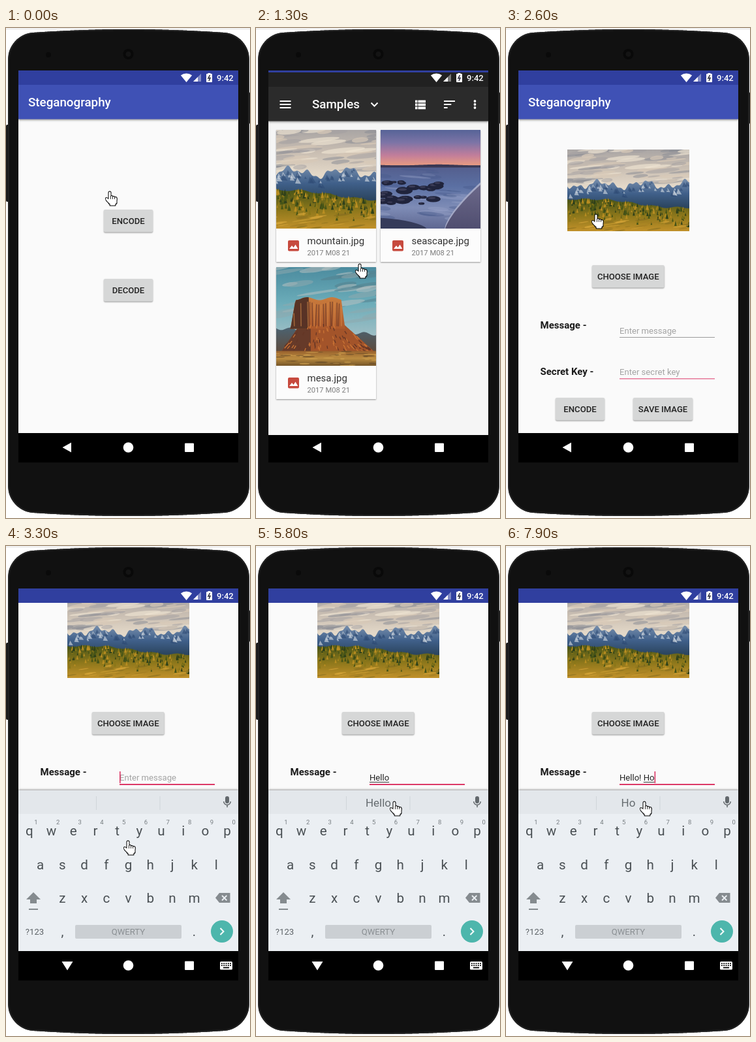
Recreate the animation shown at these times as an HTML page with a canvas. Size 374 by 750 pixels, loop 8 s.

```html
<!DOCTYPE html>
<html lang="en">
<head>
<meta charset="utf-8">
<title>Steganography demo</title>
<style>
html, body { margin: 0; width: 100%; height: 100%; overflow: hidden; background: #fff; }
canvas { display: block; width: 374px; height: 750px; }
</style>
</head>
<body>
<canvas id="stage" width="374" height="750"></canvas>
<script>
const LOOP = 8000, STEP = 100, PAN = 109;
const SCREEN = { x: 19, y: 65, w: 337, mid: 187.5 };
const BLUE = '#3f51b5', DARK_BLUE = '#303f9f', PINK = '#dc3866';
let c = document.getElementById('stage').getContext('2d');

// ---------- helpers ----------
const clamp = v => Math.max(0, Math.min(1, v));
const progress = (t, from, to) => clamp((t - from) / (to - from));
const easeOut = v => 1 - Math.pow(1 - v, 3);
const easeInOut = v => v * v * (3 - 2 * v);
const repeat = (n, draw) => { for (let i = 0; i < n; i++) draw(i); };

function rect(x, y, w, h, color) { c.fillStyle = color; c.fillRect(x, y, w, h); }
function round(x, y, w, h, r, color) {
  c.fillStyle = color; c.beginPath(); c.roundRect(x, y, w, h, r); c.fill();
}
function blob(x, y, rx, ry, color, tilt = 0) {
  c.fillStyle = color; c.beginPath(); c.ellipse(x, y, rx, ry, tilt, 0, 7); c.fill();
}
function circle(x, y, r, color) { blob(x, y, r, r, color); }
function trace(p) {
  c.beginPath();
  for (let i = 0; i < p.length; i += 2) c.lineTo(p[i], p[i + 1]);
}
function poly(color, ...p) { trace(p); c.fillStyle = color; c.fill(); }
function line(color, width, ...p) {
  trace(p); c.strokeStyle = color; c.lineWidth = width; c.stroke();
}
function text(s, x, y, size, color, weight = 400, align = 'left') {
  c.font = `${weight} ${size}px Roboto, sans-serif`;
  c.textAlign = align; c.fillStyle = color; c.fillText(s, x, y);
  return c.measureText(s).width;
}
function shadowed(draw, blur = 2, dy = 1) {
  c.save();
  c.shadowColor = '#0006'; c.shadowBlur = blur; c.shadowOffsetY = dy;
  draw();
  c.restore();
}
function layer(dy, alpha, draw) {
  c.save();
  c.globalAlpha = alpha;
  c.translate(0, Math.round(dy));
  draw();
  c.restore();
}
function gradient(y0, y1, ...colors) {
  const g = c.createLinearGradient(0, y0, 0, y1);
  colors.forEach((k, i) => g.addColorStop(i / (colors.length - 1), k));
  return g;
}
function random(seed) {
  return () => (seed = (seed * 16807) % 2147483647) / 2147483647;
}

// ---------- pictures, each drawn in a space 200 units high ----------
function ridge(width, height, base, color) {
  c.fillStyle = color; c.beginPath(); c.moveTo(0, base);
  for (let x = 0; x <= width; x += 2) c.lineTo(x, height(x));
  c.lineTo(width, base); c.fill();
}
function streaks(n, rnd, top, bottom, size, tilt, colors) {
  repeat(n, i => blob(rnd() * 300, top + rnd() * (bottom - top),
    size * (.4 + rnd()), size * (.05 + rnd() * .12), colors[i % colors.length], tilt));
}
function mountain() {
  const rnd = random(41);
  rect(0, 0, 300, 200, gradient(0, 90, '#a9a5a4', '#c9beb2', '#e3d8c8'));
  streaks(70, rnd, 0, 80, 32, -.1, ['#efe4d3aa', '#8b8d9588', '#d9cab8aa', '#a39fa188']);
  const peaks = x => 86 + 7 * Math.sin(x / 17) + 5 * Math.sin(x / 7 + 1) + 3 * Math.sin(x / 3.1);
  ridge(300, peaks, 150, gradient(76, 140, '#7189a8', '#40608a', '#2c4661'));
  repeat(60, i => {
    const x = rnd() * 300, y = peaks(x) + rnd() * 14, s = 3 + rnd() * 6;
    poly(i % 2 ? '#ccd5deaa' : '#2f4b7499', x, y, x + s, y + s * 1.6, x - s * .5, y + s * 1.5);
  });
  const hill = x => 122 + 20 * easeInOut(progress(x, 70, 260)) + 2 * Math.sin(x / 9);
  ridge(300, hill, 200, gradient(124, 200, '#4d5718', '#8d771b', '#c1912a'));
  repeat(240, i => {
    const x = rnd() * 300, depth = Math.pow(rnd(), 1.7), s = 4 + rnd() * 6;
    const y = hill(x) + depth * 45;
    poly(['#30401a', '#8a7718', '#465417', '#b88d22'][i % 4], x - s * .35, y + s, x, y - s * .4, x + s * .35, y + s);
  });
  streaks(40, rnd, 170, 200, 14, -.15, ['#d3a337aa', '#a27d22aa', '#8a701faa']);
}
function seascape() {
  const rnd = random(87);
  rect(0, 0, 204, 76, gradient(0, 76, '#566397', '#7c74a6', '#c07d9b', '#f0a07c'));
  rect(0, 72, 204, 128, gradient(72, 200, '#535d8c', '#5b70a3', '#7e8cb6', '#5e6791'));
  streaks(50, rnd, 80, 200, 28, .08, ['#98a4c866', '#46598966']);
  ridge(204, x => 71 + Math.sin(x / 25), 76, '#3a3854');
  const shore = x => 205 - 95 * progress(x, 130, 204) ** .7;
  ridge(204, x => shore(x) - 5, 205, '#a4a9c6');
  ridge(204, shore, 205, gradient(105, 200, '#6d6a8b', '#504e70'));
  repeat(26, i => {
    const far = rnd(), w = 5 + rnd() * 13, x = rnd() * (90 + 70 * (1 - far)), y = 104 + far * 48;
    blob(x, y, w, w * .42, '#20243c');
    blob(x - w * .2, y - w * .15, w * .5, w * .15, '#3b3c56');
  });
  blob(20, 196, 75, 16, '#353b5a', .1);
}
function mesa() {
  const rnd = random(23);
  rect(0, 0, 204, 170, gradient(0, 140, '#4b8b9e', '#6aabb8', '#9fbfc5'));
  streaks(40, rnd, 0, 110, 34, -.15, ['#b8c1c188', '#55808e88', '#8fa9ae88']);
  ridge(204, x => 124 + 12 * progress(x, 0, 204) + 3 * Math.sin(x / 6), 175, gradient(120, 172, '#4b6474', '#5d4a3c'));
  const slope = x => 172 - 58 * Math.min(progress(x, 10, 50), progress(x, 200, 135));
  const cliff = x => 125 - (61 + 3 * Math.sin(x / 8)) * Math.min(progress(x, 29, 39), progress(x, 140, 132));
  ridge(204, slope, 174, '#a3542a');
  ridge(70, slope, 174, '#663a29');
  ridge(204, cliff, 125, gradient(62, 125, '#c97b3c', '#ad592b'));
  ridge(66, cliff, 125, '#573426');
  repeat(22, i => {
    const x = 36 + i * 4.6;
    line(i % 3 ? '#5e302699' : '#d6884799', 2, x, cliff(x) + 9, x + rnd() * 4 - 2, 120);
  });
  repeat(90, i => {
    const x = 20 + rnd() * 165, y = slope(x) + rnd() * (168 - slope(x));
    line(i % 2 ? '#cb7535' : '#643626', 1.7, x, y, x + (x - 90) * .08, y + 6);
  });
  rect(0, 170, 204, 30, gradient(170, 200, '#98612d', '#bb8c40', '#755528'));
  streaks(60, rnd, 170, 200, 10, 0, ['#694c28aa', '#d0a24faa']);
}
function picture(paint, w, h, shift = 0) {
  const sheet = document.createElement('canvas'), main = c;
  sheet.width = w; sheet.height = h;
  c = sheet.getContext('2d');
  c.scale(h / 200, h / 200);
  c.translate(-shift, 0);
  paint();
  c = main;
  return sheet;
}
const chosen = picture(mountain, 187, 125);
const files = [['mountain.jpg', mountain, 49], ['seascape.jpg', seascape], ['mesa.jpg', mesa]]
  .map(([name, paint, shift]) => ({ name, image: picture(paint, 153, 151, shift) }));

// ---------- phone ----------
function bodyEdge(x) {
  const u = Math.abs(x) / 185, corner = Math.max(0, Math.abs(x) - 147);
  return 372.5 - 8 * u * u - 38 + Math.sqrt(38 * 38 - corner * corner);
}
function phone() {
  rect(0, 0, 374, 750, '#fff');
  rect(0, 1, 374, 1, '#dedede');
  round(0, 148, 8, 118, 2, '#1c1c1c');
  round(368, 98, 6, 49, 2, '#1c1c1c');
  c.save();
  c.translate(188, 374.5);
  c.beginPath();
  for (let x = -185; x <= 185; x++) c.lineTo(x, -bodyEdge(x));
  for (let x = 185; x >= -185; x--) c.lineTo(x, bodyEdge(x));
  c.closePath();
  c.fillStyle = '#111'; c.fill();
  c.clip();
  c.strokeStyle = '#222'; c.lineWidth = 4; c.stroke();
  c.restore();
  circle(65, 41, 4, '#0a0a0a');
  circle(187.5, 40, 8, '#090909');
  circle(187.5, 40, 4, '#141414');
}
function statusIcons() {
  c.fillStyle = '#fff';
  c.beginPath(); c.moveTo(276.5, 83);
  c.arc(276.5, 83, 13.5, -Math.PI * .72, -Math.PI * .28); c.fill();
  poly('#ffffff66', 287, 82, 299, 82, 299, 70);
  poly('#fff', 287, 82, 294, 82, 294, 75);
  round(307, 70, 9, 13, 1, '#fff');
  rect(309.5, 69, 4, 2, '#fff');
  line('#303040', 1.6, 312.5, 72, 310, 77, 313, 76.5, 311, 81);
  text('9:42', 323, 81, 13.1, '#fff', 500);
}
function navIcons(keyboardOpen) {
  if (keyboardOpen) poly('#fff', 85.5, 636, 102.5, 636, 94, 649.5);
  else poly('#fff', 100, 634.5, 100, 649.5, 86.5, 642);
  circle(SCREEN.mid, 642, 7.8, '#fff');
  round(274, 635.5, 14, 13.5, 1, '#fff');
  if (!keyboardOpen) return;
  round(328, 636, 19, 12.5, 1.5, '#fff');
  repeat(10, i => rect(330 + i % 5 * 3.3, 638 + (i > 4) * 3, 1.8, 1.8, '#000'));
  rect(333, 644.5, 9, 1.8, '#000');
}

// ---------- app screens ----------
function page(color) {
  rect(SCREEN.x, SCREEN.y, SCREEN.w, 555, color);
  rect(SCREEN.x, 620, SCREEN.w, 45, '#000');
}
function statusBar(color) { rect(SCREEN.x, SCREEN.y, SCREEN.w, 22, color); }
function toolbar(title, x, color) {
  shadowed(() => rect(SCREEN.x, 87, SCREEN.w, 52.5, color), 3);
  text(title, x, 120, 18.75, '#fff', 500);
}
function button(label, x, y, w, pressed) {
  shadowed(() => round(x, y, w, 34.5, 2, pressed ? '#c3c4c4' : '#d6d7d7'));
  text(label, x + w / 2, y + 22, 13.1, '#222', 500, 'center');
}
function home(t) {
  page('#fafafa');
  toolbar('Steganography', 34, BLUE);
  statusBar(DARK_BLUE);
  button('ENCODE', 150, 278, 75, t >= 300);
  button('DECODE', 150, 384, 75);
}

const MESSAGE = 'Hello! Ho';
const keyTime = i => i < 5 ? 4100 + 200 * i : 6100 + 230 * (i - 5);

function typed(t) {
  let n = 0;
  while (n < MESSAGE.length && keyTime(n) <= t) n++;
  const value = MESSAGE.slice(0, n), word = /[a-z]*$/i.exec(value)[0];
  return { value, word, since: n ? keyTime(n - 1) : 2900 };
}
function field(label, hint, y, underline, thickness) {
  text(label, 52.5, y, 15, '#1b1b1b', 700);
  return baseline => {
    text(hint, 174, baseline, 13.1, '#a3a3a3');
    rect(174, baseline + 5, 146, thickness, underline);
  };
}
function messageText(t) {
  const { value, word, since } = typed(t);
  const x = 174 + text(value.slice(0, value.length - word.length), 174, 468, 13.1, '#222');
  const w = text(word, x, 468, 13.1, '#222');
  rect(x, 470, w, 1, '#333');
  if (t >= 3100 && (t - since) % 1000 < 500) rect(x + w, 454, 1.6, 18, PINK);
}
function form(t, pan) {
  const writing = t >= 3000;
  page('#fafafa');
  layer(-pan, 1, () => {
    toolbar('Steganography', 34, BLUE);
    if (t >= 2300) c.drawImage(chosen, 94, 186);
    button('CHOOSE IMAGE', 132, 363, 110.5, t >= 1000 && t < 1200);
    field('Message -', typed(t).value ? '' : 'Enter message', 460, writing ? PINK : '#9b9b9b', writing ? 2 : 1)(468);
    field('Secret Key -', 'Enter secret key', 531, '#e8809f', 1.6)(531);
    messageText(t);
    button('ENCODE', 76, 566, 75);
    button('SAVE IMAGE', 195, 566, 91);
  });
  statusBar(DARK_BLUE);
}

// ---------- file picker ----------
function tile({ name, image }, x, y, pressed) {
  shadowed(() => rect(x, y, 153, 202, '#fcfcfc'));
  c.drawImage(image, x, y);
  if (pressed) rect(x, y, 153, 202, '#0002');
  round(x + 18, y + 169, 17, 16.5, 2, '#c74a3e');
  poly('#fff', x + 20, y + 182, x + 24, y + 177, x + 26.5, y + 180, x + 29.5, y + 175.5, x + 33.3, y + 182);
  text(name, x + 47.5, y + 175, 15, '#333');
  text('2017 M08 21', x + 47.5, y + 191.5, 11.2, '#7c7c7c');
}
function picker(t) {
  page('#f5f5f5');
  files.forEach((file, i) =>
    tile(file, 31 + 160 * (i % 2), 153 + 210 * (i >> 1), i === 0 && t >= 2200));
  toolbar('Samples', 86, '#2b2b2b');
  statusBar('#212121');
  repeat(3, i => {
    const y = 108 + i * 5;
    rect(36.5, y, 17, 2, '#fff');
    rect(288, y, 17 - i * 5.7, 2, '#fff');
    circle(335.5, y + 1, 1.9, '#fff');
    rect(244, y - .5, 3.5, 3.8, '#fff');
    rect(248.5, y - .5, 11.5, 3.8, '#fff');
  });
  line('#fff', 2, 176.5, 111.5, 181.5, 116.5, 186.5, 111.5);
}

// ---------- keyboard ----------
function keyboard(t) {
  const ink = '#4a5054', soft = '#858b8f', paper = '#ebeff3', pitch = 33.7;
  shadowed(() => rect(SCREEN.x, 374, SCREEN.w, 246, paper), 3, -1);
  rect(SCREEN.x, 374, SCREEN.w, 36, '#e3e7eb');
  repeat(2, i => rect(138 + i * 97.5, 383, 1, 21, '#d0d5d9'));
  text(typed(t).word, SCREEN.mid, 399, 17, '#666c70', 400, 'center');

  round(336, 383, 6, 11, 3, '#62686c');
  c.strokeStyle = '#62686c'; c.lineWidth = 1.5;
  c.beginPath(); c.arc(339, 391, 5.3, 0, Math.PI); c.stroke();
  rect(338.3, 396, 1.5, 4, '#62686c');

  ['qwertyuiop', 'asdfghjkl', 'zxcvbnm'].forEach((letters, row) => [...letters].forEach((letter, i) => {
    const x = SCREEN.mid + (i - (letters.length - 1) / 2) * pitch;
    text(letter, x, 443 + row * 51.5, 20.6, ink, 400, 'center');
    if (!row) text((i + 1) % 10, x + 10, 425.5, 9.5, '#777d81', 400, 'center');
  }));

  poly(soft, 42, 530, 53, 541, 31, 541);
  rect(37, 540, 10, 7, soft);
  rect(35, 555, 14, 2, soft);
  poly(soft, 321, 538.5, 327, 531, 343.5, 531, 343.5, 546, 327, 546);
  for (const d of [-3.7, 3.7]) line(paper, 1.8, 334.7 - d, 535, 334.7 + d, 542.5);
  text('?123', 44, 595, 13.1, '#5c6266', 400, 'center');
  text(',', 86.5, 597, 20, ink, 400, 'center');
  text('.', 288.5, 597, 20, ink, 400, 'center');
  round(106, 580, 163, 21, 2, '#cbcfd3');
  text('QWERTY', SCREEN.mid, 594.5, 13.1, '#8a8f93', 400, 'center');
  circle(331, 590, 17, '#4db6ac');
  line('#fff', 2, 328.5, 585, 333.5, 590, 328.5, 595);
}

// ---------- pointer ----------
const moves = [
  { from: 0, to: 300, x: 174, y: 284 },
  { from: 500, to: 800, x: 158, y: 361 },
  { from: 2000, to: 2200, x: 137, y: 285 },
  { from: 2600, to: 2900, x: 186, y: 451 },
  { from: 5000, to: 5600, x: 211, y: 391 }
];
function hand(grow, color) {
  repeat(4, i => {
    const top = i ? 7 + i : 1.5;
    round(5.5 + 3 * i - grow, top - grow, 3 + 2 * grow, 15 - top + 2 * grow, 1.5 + grow, color);
  });
  round(5.5 - grow, 11 - grow, 12 + 2 * grow, 9 + 2 * grow, 2, color);
  round(7.5 - grow, 17 - grow, 8 + 2 * grow, 5.5 + 2 * grow, 1, color);
  blob(4.5, 15, 5 + grow, 1.9 + grow, color, .85);
}
function pointer(t) {
  let x = 158, y = 250;
  for (const m of moves) {
    const k = easeInOut(progress(t, m.from, m.to));
    x += (m.x - x) * k;
    y += (m.y - y) * k;
  }
  c.save();
  c.translate(x - 6, y - 1);
  hand(1, '#000');
  hand(0, '#fff');
  repeat(3, i => rect(8.2 + 3 * i, 8 + i, .8, 5 - i, '#000'));
  c.restore();
}

// ---------- timeline ----------
function render(t) {
  const rise = easeOut(progress(t, 3000, 3300));
  phone();
  c.save();
  c.beginPath(); c.rect(SCREEN.x, SCREEN.y, SCREEN.w, 600); c.clip();
  if (t < 700) home(t);
  if (t >= 500) {
    const enter = progress(t, 400, 700);
    layer(50 * (1 - easeOut(enter)), enter, () => form(t, PAN * rise));
  }
  if (t >= 1100 && t < 2500) {
    const enter = progress(t, 1000, 1400), leave = progress(t, 2300, 2500);
    layer(190 * (1 - easeOut(enter)) + 40 * leave * leave,
      Math.min(1, enter * 1.6) * (1 - leave), () => picker(t));
  }
  if (rise > 0) {
    layer(246 * (1 - rise), 1, () => keyboard(t));
    rect(SCREEN.x, 620, SCREEN.w, 45, '#000');
  }
  statusIcons();
  navIcons(rise > 0);
  c.restore();
  pointer(t);
}
function tick(now) {
  render(Math.floor(now % LOOP / STEP) * STEP);
  requestAnimationFrame(tick);
}
requestAnimationFrame(tick);
</script>
</body>
</html>
```
